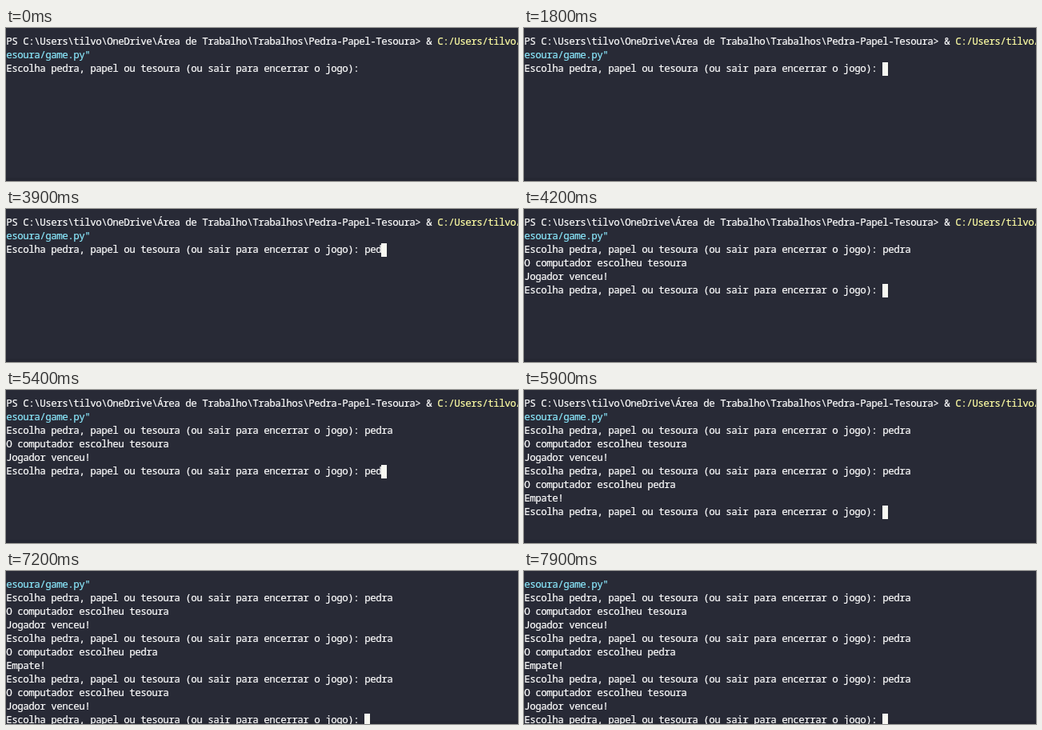
These frames come from a looping animation (640x192 px, 8 s). An HTML page:

```html
<!DOCTYPE html>
<html lang="pt">
<head>
<meta charset="utf-8">
<title>Pedra, papel ou tesoura</title>
<style>
  html, body { margin: 0; width: 100%; height: 100%; overflow: hidden; background: #282a36; }
  svg { display: block; width: 100%; height: 100%; }
  text {
    font: 500 12.5px "Noto Sans Mono", "DejaVu Sans Mono", monospace;
    letter-spacing: -0.5px; /* 7px cells */
    white-space: pre;
    fill: #fff; stroke: #fff; stroke-width: 0.2px;
  }
  .cmd { fill: #ffffa5; stroke: #ffffa5; }
  .str { fill: #8be9fd; stroke: #8be9fd; }
</style>
</head>
<body>
<svg viewBox="0 0 640 192">
  <rect width="640" height="192" fill="#282a36"/>
  <rect y="188" width="640" height="4" fill="#252732"/>
  <rect id="cursor" width="7" height="17" fill="#f8f8f2"/>
  <g id="rows"></g>
</svg>
<script>
const LOOP = 8000, CELL = 7, LINE = 17, TOP = 9, BASELINE = 12, MAX_ROWS = 11;
const ASK = 'Escolha pedra, papel ou tesoura (ou sair para encerrar o jogo): ';
const HEAD = [
  [['PS C:\\Users\\tilvo\\OneDrive\\Área de Trabalho\\Trabalhos\\Pedra-Papel-Tesoura> & '],
   ['C:/Users/tilvo/', 'cmd']],
  [['esoura/game.py"', 'str']]
];

// keys: [time, letters typed so far]; end: when the answer appears
const ROUNDS = [
  { keys: [[3700, 2], [3900, 3], [4100, 5]], end: 4200, pick: 'tesoura', result: 'Jogador venceu!' },
  { keys: [[5100, 1], [5200, 2], [5400, 3], [5600, 4], [5700, 5]], end: 5900, pick: 'pedra', result: 'Empate!' },
  { keys: [[6600, 1], [6700, 2], [6900, 3], [7000, 4], [7100, 5]], end: 7200, pick: 'tesoura', result: 'Jogador venceu!' }
];
const CURSOR_ON = 1800;

const rowsEl = document.getElementById('rows');
const cursor = document.getElementById('cursor');

function make(tag, parent, attrs) {
  const el = document.createElementNS('http://www.w3.org/2000/svg', tag);
  for (const k in attrs) el.setAttribute(k, attrs[k]);
  return parent.appendChild(el);
}

const texts = Array.from({ length: MAX_ROWS }, (_, i) =>
  make('text', rowsEl, { x: 0.25, y: TOP + i * LINE + BASELINE }));

function typedAt(round, t) {
  let n = 0;
  for (const [at, count] of round.keys) if (t >= at) n = count;
  return 'pedra'.slice(0, n);
}

function screenAt(t) {
  const lines = HEAD.slice();
  const add = s => lines.push([[s]]);
  for (const r of ROUNDS) {
    const typed = typedAt(r, t);
    add(ASK + typed);
    if (t < r.end) return { lines, col: ASK.length + typed.length };
    add('O computador escolheu ' + r.pick);
    add(r.result);
  }
  add(ASK);
  return { lines, col: ASK.length };
}

let shown = '';
function draw(t) {
  const { lines, col } = screenAt(t);
  const view = lines.slice(-MAX_ROWS);
  cursor.setAttribute('x', col * CELL);
  cursor.setAttribute('y', TOP + (view.length - 1) * LINE);
  cursor.setAttribute('visibility', t >= CURSOR_ON ? 'visible' : 'hidden');

  const key = JSON.stringify(view);
  if (key === shown) return;
  shown = key;
  texts.forEach((el, i) => {
    el.textContent = '';
    for (const [s, cls = ''] of view[i] || []) make('tspan', el, { class: cls }).textContent = s;
  });
}

const start = performance.now();
function tick() {
  draw((performance.now() - start) % LOOP);
  requestAnimationFrame(tick);
}
tick();
</script>
</body>
</html>
```
